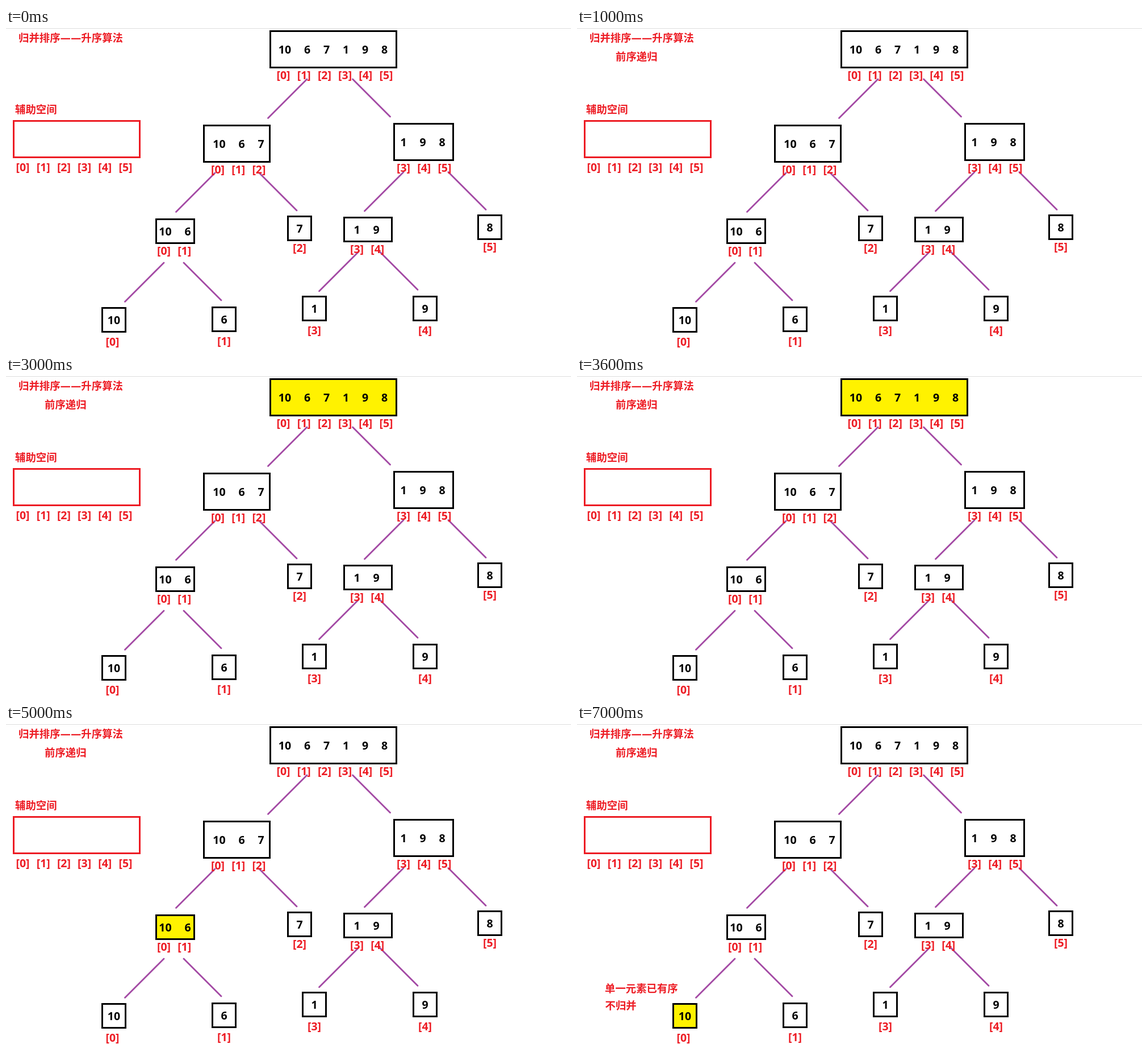
Animation, 995 px wide and 563 px high, one loop 8 s. Source, as an HTML page:

```html
<!DOCTYPE html>
<html lang="zh-CN">
<head>
<meta charset="utf-8">
<style>
  html, body { margin: 0; width: 100%; height: 100%; overflow: hidden; background: #fff; }
  svg { display: block; width: 995px; height: 563px; }
  rect { fill: #fff; stroke: #000; stroke-width: 3; }
  .on { fill: #fff200; }
  path { fill: none; stroke: #a349a4; stroke-width: 2.8; stroke-linecap: round; }
  text { font: bold 19.5px "Open Sans", "Noto Sans", sans-serif; text-anchor: middle; }
  .red { fill: #ed1c24; }
  .cjk { font: bold 18.4px "DejaVu Sans", "Noto Sans CJK SC", "Noto Sans CJK", sans-serif; text-anchor: start; }
</style>
</head>
<body>
<svg id="stage" viewBox="0 0 995 563"></svg>
<script>
const stage = document.getElementById('stage');
const data = [10, 6, 7, 1, 9, 8];

function add(tag, attrs, content = '') {
  const el = document.createElementNS('http://www.w3.org/2000/svg', tag);
  for (const k in attrs) el.setAttribute(k, attrs[k]);
  el.textContent = content;
  return stage.appendChild(el);
}

const box = (x, y, width, height, style = '') => add('rect', { x, y, width, height, style });

// Text is placed by its vertical middle.
const label = (s, x, cy, cls = '') => add('text', { x, y: cy + 7, class: cls }, s);
const red = (s, x, cy) => label(s, x, cy, 'red cjk');

function indices(first, count, x, cy) {
  for (let i = 0; i < count; i++) label(`[${first + i}]`, x + 36.2 * i, cy, 'red');
}

// Key points in preorder: corner of each box; groups also have their width,
// the inset of the first value, and where the two branches start (xl, xr, y).
const layout = [
  [465.5, 5.5, 222, 25.5, 530, 610.5, 90],
  [348.5, 171.5, 116, 27, 368, 446, 255],
  [264.5, 336.5, 67, 16, 278, 313, 413],
  [169.5, 492.5],
  [363.5, 491.5],
  [496.5, 331.5],
  [683.5, 168.5, 104, 16.5, 700, 779, 253.5],
  [595.5, 333.5, 84, 22.5, 620, 659, 394.5],
  [522.5, 472.5],
  [717.5, 472.5],
  [831.5, 329.5]
];
const boxes = [];

function split(first, count, depth) {
  const [x, y, w = 41, inset = w / 2, xl, xr, yb] = layout[boxes.length];
  const h = count > 2 ? 64 : 42;
  boxes.push(box(x, y, w, h));
  if (count > 1) add('path', { d: `M${xl} ${yb}l-68.5 68.5M${xr} ${yb}l66 66` });

  let vx = x + inset;
  const ix = data[first] > 9 ? vx - 2.5 : vx;
  for (const v of data.slice(first, first + count)) {
    label(v, vx, y + h / 2 + 0.5);
    vx += v > 9 ? 39.5 : 34;
  }
  indices(first, count, ix, y + h + (depth < 3 ? 13.8 : 17.3));

  if (count > 1) {
    const half = Math.ceil(count / 2);
    split(first, half, depth + 1);
    split(first + half, count - half, depth + 1);
  }
}

add('path', { d: 'M0 .5H995', style: 'stroke:#dcdcdc;stroke-width:1' });
split(0, data.length, 0);

box(13.5, 163.5, 222, 64, 'stroke:#ed1c24');
indices(0, data.length, 29.5, 245);

red('归并排序——升序算法', 22, 17);
red('辅助空间', 16, 143);
const order = red('前序递归', 68, 49.5);
const notes = [red('单一元素已有序', 49, 464.5), red('不归并', 49.5, 495)];

const show = (el, on) => el.setAttribute('visibility', on ? 'visible' : 'hidden');

function draw(now) {
  const second = Math.floor(now % 8000 / 1000);
  const active = Math.min(second - 3, 3);
  boxes.forEach((b, i) => b.classList.toggle('on', i === active));
  show(order, second >= 1);
  notes.forEach(n => show(n, second >= 7));
}

const start = performance.now();
function tick() {
  draw(performance.now() - start);
  requestAnimationFrame(tick);
}
tick();
</script>
</body>
</html>
```
